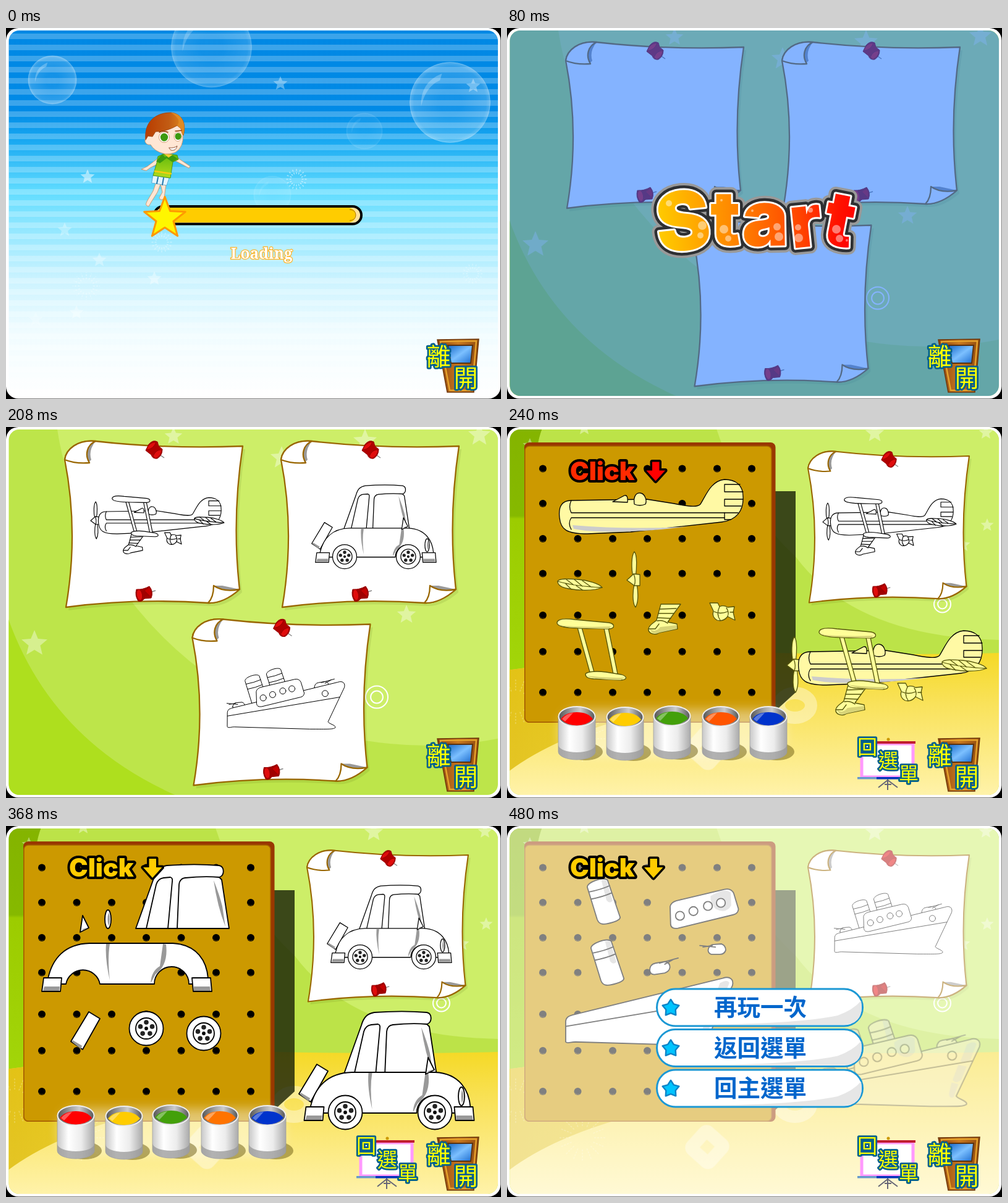
An HTML page that plays this animation: 801x601 px, repeating every 560 ms.

```html
<!DOCTYPE html>
<html lang="zh-Hant">
<head>
<meta charset="utf-8">
<title>Colouring game</title>
<style>
html, body { margin: 0; width: 100%; height: 100%; overflow: hidden; background: #000; }
svg { display: block; width: 801px; height: 601px; }
.cjk { font-family: "Noto Sans CJK TC", "Noto Sans CJK", sans-serif; text-anchor: middle; }
.heavy { font-family: Inter, "Liberation Sans", sans-serif; font-weight: 900; }
.round { stroke-linejoin: round; stroke-linecap: round; }
.shade { fill: var(--shade, none); stroke: none; }
.line { fill: none; }
.tinted .fuselage { fill: #fff9a4; stroke: #000; --shade: #ccc; }
</style>
</head>
<body>
<svg id="stage" viewBox="0 0 801 601"></svg>
<script>
const STEP = 80;
const path = (d, attrs = '') => `<path d="${d}" ${attrs}/>`;
const circle = (x, y, r, attrs = '') => `<circle cx="${x}" cy="${y}" r="${r}" ${attrs}/>`;
const ellipse = (x, y, rx, ry, attrs = '') => `<ellipse cx="${x}" cy="${y}" rx="${rx}" ry="${ry}" ${attrs}/>`;
const rect = (x, y, w, h, attrs = '') => `<rect x="${x}" y="${y}" width="${w}" height="${h}" ${attrs}/>`;
const group = (attrs, body) => `<g ${attrs}>${body}</g>`;
const at = (x, y, body, scale = 1) => group(`transform="translate(${x} ${y}) scale(${scale})"`, body);
const line = d => path(d, 'class="line"');
const shade = d => path(d, 'class="shade"');
const cover = attrs => rect(0, 0, 801, 601, attrs);
const range = (n, make) => Array.from({ length: n }, (_, i) => make(i)).join('');

function star(x, y, r, attrs, inner = 0.45) {
  const points = Array.from({ length: 10 }, (_, i) => {
    const a = i * Math.PI / 5, q = i % 2 ? r * inner : r;
    return `${(x + q * Math.sin(a)).toFixed(1)},${(y - q * Math.cos(a)).toFixed(1)}`;
  });
  return `<polygon points="${points.join(' ')}" ${attrs}/>`;
}

function burst(x, y, r, opacity) {
  const rays = range(16, i => {
    const a = i * Math.PI / 8, c = Math.cos(a), s = Math.sin(a);
    return `M${x + c * r * .5} ${y + s * r * .5}L${x + c * r} ${y + s * r}`;
  });
  return path(rays, `stroke="#fff" stroke-width="1.5" stroke-dasharray="3 2" opacity="${opacity}"`);
}

const gradient = (id, attrs, stops) => `<linearGradient id="${id}" ${attrs}>` +
  stops.map(([o, c]) => `<stop offset="${o}" stop-color="${c}"/>`).join('') + '</linearGradient>';
const down = 'x1="0" y1="0" x2="0" y2="1"';

const defs = `<defs>
  <clipPath id="panel">${rect(4.5, 4, 791.5, 592, 'rx="17"')}</clipPath>
  <filter id="soft" x="-20%" y="-50%" width="140%" height="200%"><feGaussianBlur stdDeviation="9"/></filter>
  <radialGradient id="bubble"><stop offset=".3" stop-color="#fff" stop-opacity=".08"/>
    <stop offset=".9" stop-color="#fff" stop-opacity=".18"/><stop offset="1" stop-color="#fff" stop-opacity=".32"/></radialGradient>
  ${gradient('sky', down, [[0, '#0088e4'], [.22, '#008ae6'], [.31, '#1cabf2'], [.44, '#60dcff'], [.53, '#8de6ff'], [.68, '#ccf3ff'], [.82, '#f0fcff'], [1, '#fff']])}
  ${gradient('floor', down, [[0, '#f5d926'], [.35, '#f9e25a'], [1, '#fff3ac']])}
  ${gradient('gold', 'x1="0" y1="0" x2="1" y2="0"', [[0, '#dfbd10'], [1, '#f2d624']])}
  ${gradient('leaf', down, [[0, '#84b400'], [.3, '#86b900'], [.31, '#9ccc00'], [1, '#a4d80c']])}
  ${gradient('hot', 'gradientUnits="userSpaceOnUse" x1="243" y1="0" x2="567" y2="0"', [[0, '#fc0'], [.35, '#ff8c00'], [.7, '#ff4800'], [.9, '#f10'], [1, '#f00']])}
  ${gradient('tin', '', [[0, '#c8c8c8'], [.3, '#fff'], [.65, '#ececec'], [1, '#aaa']])}
  ${gradient('rim', '', [[0, '#555'], [.4, '#aaa'], [.6, '#ccc'], [1, '#555']])}
  ${gradient('glass', 'x1="0" y1="0" x2="1" y2="1"', [[0, '#1668c8'], [.5, '#7cc0ff'], [1, '#1b6cd0']])}
  ${gradient('wood', '', [[0, '#8a4310'], [.5, '#c9781e'], [1, '#8f4a10']])}
  ${gradient('hair', '', [[0, '#b83c00'], [.6, '#c25c14'], [1, '#e08a1c']])}
  ${gradient('shirt', down, [[0, '#5cb80c'], [1, '#b4dc1c']])}
</defs>`;

// Each part: [markup, place on the board, place when built, place on the finished board].
const bumper = path('M61 246H90L88 268H58Z') + path('M301 246H331L333 268H303Z');
const wheel = (x, y) => circle(x, y, 27.5) + circle(x, y, 17) + circle(x, y, 2, 'fill="#000"') +
  range(5, i => circle(x + 10 * Math.sin(i * 1.257), y - 10 * Math.cos(i * 1.257), 3.8, 'fill="#222" stroke="none"'));

const fuselage = group('class="fuselage"',
  path('M104 119C88 119 83 130 85 147C87 166 96 173 130 173L200 170L347 154C372 151 383 135 382 113C382 94 370 85 352 85C330 87 322 111 313 125C308 131 290 128 270 124L226 117Z') +
  path('M171 121L190 111Q196 109 195 122Z') + path('M206 125C204 111 210 106 216 107C223 108 227 119 224 125Q215 129 206 125Z') +
  shade('M106 159Q200 167 296 161L250 166Q150 174 108 165Z') +
  line('M104 119Q99 129 104 139H352M104 166Q98 156 104 147H352') +
  line('M377 93H352V105H382M382 117H352V128H379M374 139H352V150H362'));
const plane = [
  [path('M328 285H341L344 291Q350 288 357 292L368 291L366 300L369 313L357 307Q350 316 340 313Q331 308 334 298Z') +
    line('M335 299Q345 304 357 299M344 291Q338 303 345 313M355 293Q360 300 357 307M361 300H367'), [0, 0], [304, 130]],
  [path('M249 287H281L260 316L275 319L276 327L247 333C240 338 228 335 229 327C230 320 238 317 242 313Z') +
    shade('M231 327Q240 334 248 324L275 321V327L247 333Q235 338 231 327') +
    line('M247 295L274 294M245 302L270 302M243 309L265 310M243 314Q252 312 260 318M229 327H240L246 319'), [0, 0], [303, 131]],
  [path('M206 202C211 207 210 230 208 242H204C201 230 201 208 206 202Z') + path('M206 254H210C212 266 213 283 208 292C203 286 203 268 206 254Z') +
    path('M194 248L205 238L215 239V257H206Z') + line('M205 238Q209 248 206 257'), [0, 0], [259, 138]],
  [fuselage, [0, 0], [387, 245]],
  [path('M82 250C84 245 100 246 115 247C130 248 150 254 154 260C140 266 115 265 100 262C88 260 82 256 82 250Z') +
    line('M82 250Q110 258 154 260M96 247L108 256M109 247L122 258M122 249L136 259M95 254L104 263M112 257L122 264'), [0, 0], [622, 131]],
  [path('M114 325L134 397H141L121 325ZM157 326L172 400H179L164 326Z') +
    path('M81 317C82 310 95 310 110 312L165 317C175 319 175 326 165 327C130 326 80 328 81 317Z') +
    path('M127 400C130 396 145 395 160 397L185 401C195 404 195 409 185 410L140 408C130 407 127 405 127 400Z') +
    shade('M84 321Q120 325 169 323L164 327Q100 326 84 321M130 403Q160 407 190 406L184 410Q140 409 130 403'), [0, 0], [424, 15]]
];

const car = [
  [path('M134 301L152 312L124 362L105 349Z') + shade('M108 347L123 356L121 361L107 350Z'), [0, 0], [369, 85]],
  [path('M210 166L239 85C243 71 249 66 260 64C290 62 320 62 345 64C354 66 354 80 345 83L349 87L361 166Z') +
    line('M227 166L243 95Q246 85 255 84L266 83Q270 84 269 90L262 166M277 166L280 95Q281 85 290 84Q320 81 345 83') +
    shade('M336 88Q345 110 350 130L355 163Q342 130 336 88Z'), [0, 0], [336, 238]],
  [path('M68 247C75 215 95 191 135 190H270C310 192 325 220 327 247V256H296A28 28 0 0 0 240 256H152A28 28 0 0 0 97 256H70Z') + bumper +
    shade('M162 191H168Q164 215 168 250Q160 215 162 191M254 191L259 192Q263 225 242 240L234 255Q235 235 249 227ZM62 260H87L86 267H60ZM304 260H330L331 267H304Z'), [0, 0], [424.5, 209]],
  [path('M124 145L134 165L120 172Z') + shade('M122 168L132 164L126 168Z'), [0, 0], [559, 230]],
  [ellipse(165, 151, 5, 15) + shade('M166 140Q170 151 166 162Q163 151 166 140'), [0, 0], [572, 287]],
  [wheel(227, 328), [0, 0], [322, 136]],
  [wheel(320, 336), [0, 0], [374, 128]]
];

const funnel = path('M115 188C114 178 146 167 154 174L178 245C182 253 152 260 144 259Q137 258 134 250Z') +
  shade('M142 174L152 174L164 214Q158 221 152 213Z') + line('M118 197Q140 193 158 185M122 211Q144 207 162 199');
const ship = [
  [funnel, [0, 0], [388, 140], [39.6, 40.7]],
  [funnel, [8, -96], [447, 122], [33.6, -58.3]],
  [path('M207 262Q207 250 218 248L236 245Q246 246 246 256Q245 264 236 267L216 270Q208 270 207 262Z') + line('M226 248L262 238M236 250L254 240'), [0, 0], [487, 85], [57.5, 14.4]],
  [path('M304 250Q306 239 316 239L330 238Q338 241 338 250Q335 259 325 258L310 258Q304 256 304 250Z') + line('M288 241L318 244M294 244L312 241'), [0, 0], [165, 149], [70.7, -8.4]],
  [path('M63 362C64 353 70 352 76 350L366 279C380 274 388 281 385 293L340 388C343 394 362 397 360 404C355 409 340 408 290 408L82 402C72 402 66 406 63 402Z') +
    shade('M361 288Q376 280 379 288L367 318Q356 328 348 321ZM344 328L360 331L350 356Q340 366 333 357ZM331 362L344 365L335 390Q327 394 326 384Z') +
    line('M63 372L372 320') + circle(332, 310, 8.5), [0, 0], [391.5, 53], [42.2, 12.9]],
  [path('M220 120Q222 112 232 109L325 87Q338 84 343 95L352 125Q351 134 342 136L235 162Q222 164 221 155Z') +
    shade('M298 100Q325 83 337 93L338 118Q328 135 308 125Q297 113 298 100Z') +
    circle(239, 138, 8.5) + circle(265, 129, 8.5) + circle(293, 119, 8.5) + circle(318, 113, 8.5), [0, 0], [314, 237], [79.6, 29.8]]
];

const place = (kit, slot, scale = 1) => kit.map(part => at(...part[slot], part[0], scale)).join('');
const built = (kit, x, y, scale, ink) => group(ink, at(x, y, place(kit, 2), scale));
const outline = 'class="round" fill="#fff" stroke="#000" stroke-width="1.7"';

const pins = group('stroke="#900" stroke-width="1"',
  path('M243 41L256 50', 'stroke="#888" stroke-width="1.5"') +
  path('M226 38L231 28Q238 20 245 24L247 31L253 36Q253 46 245 51Q237 52 235 45Z', 'fill="#b00000"') +
  path('M227 37Q231 25 243 24Q239 36 227 37ZM238 47Q243 36 252 37Q251 47 242 51Z', 'fill="#e00c0c"') +
  path('M232 268L242 265', 'stroke="#888" stroke-width="1.5"') +
  path('M211 263Q221 264 232 258Q239 267 235 277L224 278Q219 284 214 282Q208 273 211 263Z', 'fill="#a00000"') +
  ellipse(216, 272, 4.5, 9, 'fill="#e00c0c" transform="rotate(-10 216 272)"') + path('M224 265Q230 261 232 260Q237 267 234 275Z', 'fill="#c40000"'));
const sheet = 'M145 23Q260 36 383 31Q365 150 378 263Q352 286 327 285Q210 277 97 292Q118 170 95 53C97 36 116 20 145 23Z';
const paper = at(4, 5, path(sheet, 'fill="#340" opacity=".1"')) +
  group('fill="#fff" stroke="#960" stroke-width="2.3" stroke-linejoin="round"', path(sheet) +
    path('M145 23C131 30 127 45 134 57L138 53Q133 38 145 23M336 257Q352 267 378 263L350 257Z', 'fill="#999" stroke="none"') +
    path('M95 53C97 36 116 20 145 23C131 29 127 45 135 58Q113 60 95 53ZM336 257Q352 268 378 263Q352 286 327 285Q336 276 336 257Z')) + pins;

const backStar = (x, y, r) => star(x, y, r, 'fill="#fff" opacity=".38"');
const rings = (x, y, r) => group('fill="none" stroke="#fff" stroke-width="2"', circle(x, y, r) + circle(x, y, r * .55));
const papers = cover('fill="#bde54a"') + circle(680, -88, 604, 'fill="#cdee68"') +
  path('M0 300Q70 510 285 601H0Z', 'fill="#aedf1e"') +
  backStar(46, 351, 22) + backStar(271, 15, 15) + backStar(581, 23, 20) + backStar(446, 50, 19) + backStar(766, 13, 19) + backStar(648, 304, 16) +
  rings(600, 437.5, 18) + paper + at(350, 0, paper) + at(206.5, 288.5, paper);

const room = cover('fill="#bce348"') +
  path('M338 0Q380 130 467 210Q565 342 801 345V0Z', 'fill="#cdee68"') + path('M0 0H58Q30 60 28 480H0Z', 'fill="url(#leaf)"') +
  backStar(37, 30, 12) + backStar(125, 2, 12) + backStar(595, 10, 16) + backStar(777, 159, 11) + backStar(775, 9, 12) + backStar(738, 191, 12) +
  path('M0 394Q230 362 435 366T801 366V601H0Z', 'fill="url(#floor)"') + path('M0 394Q230 362 435 366V430Q130 460 0 560Z', 'fill="url(#gold)" opacity=".85"') +
  group('fill="none" stroke="#fff" opacity=".38"', ellipse(466, 451, 26, 20, 'stroke-width="20"') +
    rect(-19, -19, 38, 38, 'rx="4" stroke-width="21" transform="translate(324 520) rotate(42)"')) +
  burst(14, 445, 36, .25) + burst(122, 505, 38, .25) + rings(704.5, 287, 13.5) + at(401, 18.8, paper, '.906 .91');

const columns = [58, 114.5, 171, 227, 283.5, 340, 396], rows = [67.5, 124, 181, 237.5, 305, 364, 430];
const board = path('M434 104H467V430L432 462Z', 'fill="#1c2408" opacity=".82"') +
  rect(28, 25, 406.5, 454, 'rx="8" fill="#993800"') +
  rect(29, 31, 399, 447, 'rx="7" fill="#c90" stroke="#a86400" stroke-width="1.5"') +
  rows.map(y => columns.map(x => circle(x, y, 6, 'fill="#000"') + path(`M${x - 5} ${y + 2}A5.5 5.5 0 0 0 ${x + 3} ${y + 4}`, 'fill="none" stroke="#5a4208"')).join('')).join('');

const pot = (x, y, color) => at(x, y, ellipse(14, 57, 28, 14, 'fill="#6b5a10" opacity=".5"') +
  path('M-30 0V57A30 13 0 0 0 30 57V0Z', 'fill="url(#tin)" stroke="#999" stroke-width=".7"') +
  path('M-30 46A30 12 0 0 0 30 46V57A30 13 0 0 1 -30 57Z', 'fill="#999" opacity=".75"') +
  ellipse(0, 0, 29.5, 16, 'fill="url(#rim)" stroke="#eee" stroke-width="2"') +
  path('M-26 4Q-18 -7 0 -7T26 4Q16 14.500 0 14.500T-26 4Z'.replaceAll('.500', '.5'), `fill="${color}"`) +
  path('M-24 4Q-17 -5 -6 -6Q-13 2 -19 8Z', 'fill="#fff" opacity=".35"'));
const pots = orange => rect(85, 458, 365, 75, 'rx="30" fill="#fff" opacity=".45" filter="url(#soft)"') +
  pot(113, 469, '#f00') + pot(191, 470, '#fc0') + pot(267, 468, '#43a00a') + pot(346, 469, orange) + pot(423, 469, '#03c');

function click(color, arrowColor = color, shift = 0) {
  const edge = 'stroke="#000" stroke-linejoin="round" style="paint-order:stroke"';
  return `<text class="heavy" x="102" y="${82 + shift}" font-size="41" fill="${color}" stroke-width="8" ${edge}>Click</text>` +
    at(shift, shift, path('M231.5 53H243V67H252.5L237 84L222 67H231.5Z', `fill="${arrowColor}" stroke-width="7" ${edge}`));
}

const label = (text, x, y, size) => `<text class="cjk" x="${x}" y="${y}" font-size="${size}" font-weight="500" fill="#ff0" stroke="#00608c" stroke-width="5.5" stroke-linejoin="round" style="paint-order:stroke">${text}</text>`;
const door = path('M698 505L765 504L757 590H714Z', 'fill="url(#wood)" stroke="#70380a" stroke-width="1.5"') +
  path('M703 508L761 507L754 587H718Z', 'fill="none" stroke="#e6a22c" stroke-width="2.5"') +
  path('M715 514H755L752 543H720Z', 'fill="url(#glass)" stroke="#5a3210" stroke-width="2"') +
  label('離', 700, 545.5, 39) + label('開', 744, 580.5, 39);
const easel = path('M616 572L601 584M616 572L632 584M616 566V588M611 579H622', 'stroke="#667" stroke-width="2"') + circle(617, 506, 2.5, 'fill="#c90"') +
  rect(574, 513, 83, 54, 'fill="#fff" stroke="#f9f" stroke-width="5"') + rect(574, 509, 87, 4, 'fill="#c01c30"') +
  rect(567, 567, 94, 3.5, 'fill="#69c"') + rect(598, 567, 38, 3.5, 'fill="#03b"') +
  label('回', 583, 529.5, 32) + label('選', 617, 551.5, 32) + label('單', 650, 573.5, 32);

const bubble = (x, y, r, opacity) => group(`opacity="${opacity}"`, circle(x, y, r, 'fill="url(#bubble)" stroke="#fff" stroke-opacity=".25"') +
  path(`M${x - r * .72} ${y + r * .1}Q${x - r * .75} ${y - r * .5} ${x - r * .2} ${y - r * .72}L${x - r * .25} ${y - r * .55}Q${x - r * .6} ${y - r * .4} ${x - r * .72} ${y + r * .1}`, 'fill="#fff" opacity=".25"'));
const boy = group('class="round" stroke="#c98a5a" stroke-width=".8" fill="#ffe6d4"',
  path('M243 250L238 264L228 281Q224 288 231 289L235 282L245 266L250 253ZM250 252L253 266L248 275Q250 281 256 276L259 252Z') +
  path('M246 211L229 224L219 229L227 231L234 226L248 219ZM274 208L289 218L298 224L296 227L287 222L272 214Z') +
  path('M238 239L264 243L260 255L236 251Z', 'fill="#e4f5ff" stroke="#4ca0c8"') + path('M246 242L244 252M255 243L253 254', 'stroke="#27a" stroke-width="2"') +
  path('M246 208L258 203L277 206L279 213L270 217L266 243L238 239L244 218Z', 'fill="url(#shirt)" stroke="#3a8a08"') +
  path('M243 216L253 204L257 209L268 205L278 212L269 217L260 211L249 219Z', 'fill="#3a9a10" stroke="none"') +
  path('M241 232L267 236', 'stroke="#f8cc10" stroke-width="2.5"') + path('M256 204L263 210L270 205Z', 'fill="#fc3" stroke="none"') +
  path('M233 167Q224 176 225 184Q227 190 234 189Q240 200 257 204Q277 206 284 190Q290 175 281 158Q260 148 233 167Z') +
  path('M226 181C223 153 241 137 267 137C286 139 292 156 287 174Q284 171 283 163L277 158Q260 168 242 168L237 176L230 175Z', 'fill="url(#hair)" stroke="#964010"') +
  path('M267 137C286 139 292 156 287 174Q284 171 283 163L277 158Q285 148 267 137Z', 'fill="#e08a22" stroke="none"') +
  ellipse(256, 177, 8.5, 8.5, 'fill="#fff"') + ellipse(278, 176, 6, 7.5, 'fill="#fff"') +
  ellipse(256, 177, 6.2, 6.5, 'fill="#3c9a10" stroke="none"') + ellipse(278.5, 175.5, 5, 5.5, 'fill="#3c9a10" stroke="none"') +
  path('M248 169Q255 165 262 169M274 167L284 166', 'fill="none" stroke="#964010" stroke-width="1.5"') +
  path('M264 194Q272 195 277 191Q275 200 267 198Z', 'fill="#fff" stroke="#7a3010"'));
const loading = cover('fill="url(#sky)"') +
  range(33, i => rect(0, 18 * i + 9, 801, 9, 'fill="#fff" opacity=".23"')) +
  bubble(75, 84, 39, 1) + bubble(332.5, 31, 65, .8) + bubble(718.5, 120.5, 65, 1) + bubble(580, 167, 29, .35) + bubble(431, 270, 30, .35) +
  [[444, 90, .35], [756, 94, .35], [132, 241, .5], [95, 327, .3], [151, 376, .3], [240, 406, .35], [114, 461, .3], [48, 472, .2]]
    .map(([x, y, o]) => star(x, y, 12, `fill="#fff" opacity="${o}"`)).join('') +
  burst(470, 245, 17, .5) + burst(252, 347, 17, .35) + burst(130, 418, 22, .3) + burst(755, 398, 16, .25) +
  rect(240, 289, 335, 28.5, 'rx="14" fill="#ffe19a" stroke="#000" stroke-width="4"') +
  path('M250 291H556Q566 294 566 303T556 315H250Z', 'fill="#fc0"') +
  path('M556 294Q566 295 566 303T556 312', 'fill="none" stroke="#a87400"') + boy +
  star(257, 308.5, 35, 'fill="#fff600" stroke="#f90" stroke-width="3" stroke-linejoin="round"', .42) +
  '<text x="363.5" y="374" font-family="Noto Serif, Liberation Serif, serif" font-weight="900" font-size="24.5" fill="#fff" stroke="#ffb428" stroke-width="2.5" style="paint-order:stroke">Loading</text>';

const letter = (char, x, y, size, turn) => `<text x="${x}" y="${y}" font-size="${size}" transform="rotate(${turn} ${x + size / 4} ${y - size / 3})">${char}</text>`;
const word = letter('S', 241, 361, 132, -6) + letter('t', 329, 352, 122, 0) + letter('a', 380, 353, 126, -1) + letter('r', 457, 354, 120, -6) + letter('t', 514, 354, 122, 11);
const dots = [[262, 284, 5], [316, 320, 7], [313, 336, 5], [347, 279, 2], [351, 326, 7], [358, 341, 5], [397, 296, 2], [437, 322, 6], [440, 338, 7],
  [471, 323, 5], [472, 340, 7], [491, 295, 4], [533, 326, 7], [538, 341, 6], [550, 344, 2]];
const start = group('class="heavy round"',
  group('stroke="#999" stroke-width="23"', word) + group('stroke="#2e3033" stroke-width="15"', word) +
  group('stroke="#fff" stroke-width="6"', word) + group('fill="url(#hot)"', word)) +
  dots.map(([x, y, r]) => circle(x, y, r, 'fill="#fff" opacity=".45"')).join('');

const button = (text, y) => rect(242.5, y + 1, 333, 60, 'rx="30" fill="#fff" stroke="#1c98d4" stroke-width="3"') +
  path(`M300 ${y + 59}Q470 ${y + 58} 535 ${y + 44}Q560 ${y + 35} 573 ${y + 20}Q579 ${y + 58} 545 ${y + 59}Z`, 'fill="#e6e6e6"') +
  star(265, y + 32, 14, 'fill="#00c4ff" stroke="#0c84c8" stroke-width="2.5" stroke-linejoin="round"', .58) +
  `<text class="cjk" x="410" y="${y + 44}" font-size="37.5" font-weight="700" fill="#06c">${text}</text>`;

const planeInk = 'class="round tinted" fill="#ff9" stroke="#55550c" stroke-width="1.3" style="--shade:#d8d478"';
const carInk = 'class="round" fill="#fff" stroke="#000" stroke-width="1.8" style="--shade:#999"';
const shipInk = 'class="round" fill="#ffff80" stroke="#808000" stroke-width="2.2" style="--shade:#e2de68"';
const greyInk = 'class="round" fill="#fff" stroke="#000" stroke-width="2.2" style="--shade:#ccc"';
const paleInk = 'class="round" opacity=".55" fill="#f2ecb0" stroke="#111" stroke-width="2.2" style="--shade:#ccc"';
const shipOnPaper = built(ship, 263, -63.7, .588, outline);

const workshop = (kit, ink, heading, orange, onPaper) =>
  room + board + group(ink, place(kit, 1)) + heading + onPaper + pots(orange) + built(kit, 0, 0, 1, ink) + easel;

const scenes = [
  loading,
  papers + cover('fill="#146dff" opacity=".52"') + start,
  papers + built(plane, -165.6, -106.1, .668, outline) + built(car, 158.2, -119.4, .71, carInk) + built(ship, 91, 218.3, .588, outline),
  workshop(plane, planeInk, click('#ff2a00', '#f00', 3.5), '#f50', built(plane, 208.4, -104, .668, outline)),
  workshop(car, carInk, click('#fc0'), '#ff7300', built(car, 183.2, -117.4, .71, carInk)),
  workshop(ship, shipInk, click('#fc0'), '#ff6000', shipOnPaper),
  room + board + group(greyInk, place(ship, 3, .838)) + shipOnPaper + built(ship, 113.9, 67.8, .838, paleInk) +
    cover('fill="#fff" opacity=".5"') + click('#fc0') +
    button('再玩一次', 263) + button('返回選單', 328.5) + button('回主選單', 394) + easel
];

const stage = document.getElementById('stage');
stage.innerHTML = defs + rect(0, 0, 800.5, 600.5, 'rx="20" fill="#fff"') +
  group('clip-path="url(#panel)"', scenes.map(body => group('class="scene" display="none"', body)).join('')) + door;
const layers = [...stage.querySelectorAll('.scene')];

function render(time) {
  const current = Math.floor(time / STEP) % layers.length;
  layers.forEach((layer, i) => layer.setAttribute('display', i === current ? 'inline' : 'none'));
}

const began = performance.now();
function tick() {
  render(performance.now() - began);
  requestAnimationFrame(tick);
}
render(0);
requestAnimationFrame(tick);
</script>
</body>
</html>
```
